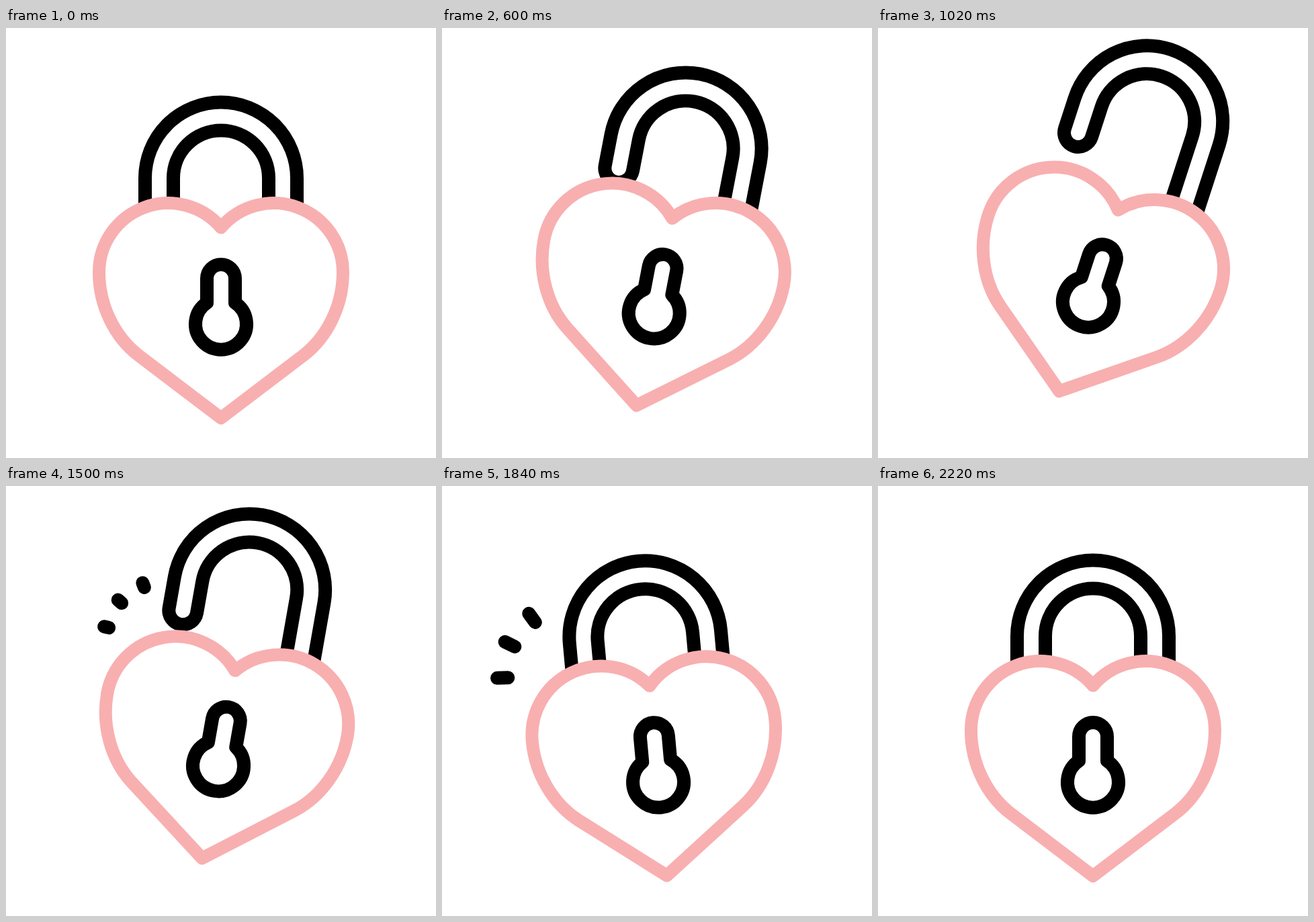
Animation, 640 px wide and 640 px high, one loop 2400 ms. Source, as an HTML page:

```html
<!DOCTYPE html>
<html lang="en">
<head>
<meta charset="utf-8">
<title>Heart padlock</title>
<style>
  html, body { margin: 0; height: 100%; overflow: hidden; background: #fff; }
  svg {
    display: block; width: 100vw; height: 100vh;
    fill: none; stroke: #000; stroke-width: 20; stroke-linecap: round; stroke-linejoin: round;
  }
  #heart { fill: #fff; stroke: #f8afb0; stroke-width: 19; }
  .outer { stroke-width: 62; }
  .inner { stroke: #fff; stroke-width: 22; }
</style>
</head>
<body>
<svg viewBox="0 0 640 640">
  <defs><path id="arch" d="M228 271V223.500a92 92 0 0 1 184 0V384"/></defs>
  <g id="lock">
    <g id="shackle">
      <use class="outer" href="#arch"/>
      <use class="inner" href="#arch"/>
    </g>
    <path id="heart" d="M320 297A103 103 0 0 0 138.500 364C138.500 413 162 460 197 487L320 580.500L443 487C478 460 501.500 413 501.500 364A103 103 0 0 0 320 297Z"/>
    <path d="M299 409V373a21 21 0 0 1 42 0V409A38 38 0 1 1 299 409Z"/>
    <path id="sparks"/>
  </g>
</svg>
<script>
const LOOP = 2400, LAG = 3, SPARK = 29;
const [lock, shackle, sparks] = ['lock', 'shackle', 'sparks'].map(id => document.getElementById(id));

// Smooth 0 to 1 between two times.
function ease(t, start, end) {
  const p = Math.min(1, Math.max(0, (t - start) / (end - start)));
  return p * p * (3 - 2 * p);
}

// Three rays fan out from a point at the open end of the shackle.
function fan(from, to) {
  if (to <= from) return '';
  let d = '';
  for (let i = 0; i < 3; i++) {
    const angle = (3.4 + 28 * i) * Math.PI / 180;
    const point = r => `${208.8 - r * Math.cos(angle)} ${271.6 - r * Math.sin(angle)}`;
    d += `M${point(85 + from)}L${point(85 + to)}`;
  }
  return d;
}

function draw(t) {
  const open = ease(t, 200, 1000), shut = ease(t, 1400, 1700), swing = ease(t, 1700, 2000);
  const up = open - shut;
  const tilt = 18 * ease(t, 200, 900) - 32 * shut + 20 * swing - 6 * ease(t, 2000, 2200);
  lock.setAttribute('transform', `translate(0 ${-32 * up}) rotate(${tilt} 320 418)`);
  shackle.setAttribute('transform', `translate(0 ${-65 * up})`);
  sparks.setAttribute('d', fan(SPARK * swing, SPARK * shut));
}

function tick() {
  draw(performance.now() % LOOP - LAG);
  requestAnimationFrame(tick);
}
tick();
</script>
</body>
</html>
```
